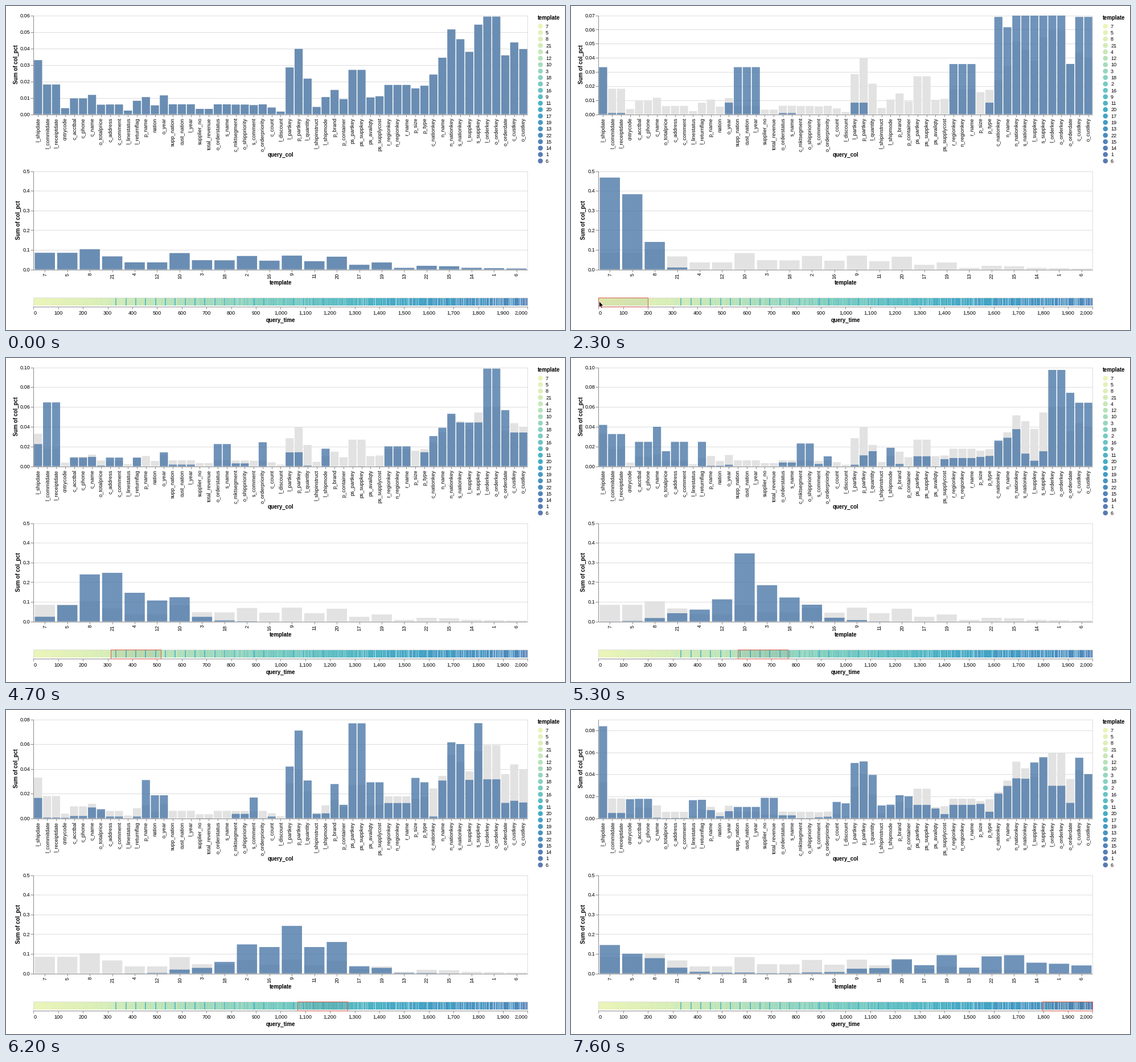
Animation of 982 by 570 pixels, one loop 7800 ms. Source, as a matplotlib script:

```python
import numpy as np
import matplotlib.pyplot as plt
from matplotlib.animation import FuncAnimation
from matplotlib.collections import LineCollection, PolyCollection
from matplotlib.colors import LinearSegmentedColormap
from matplotlib.patches import Circle, Polygon, Rectangle

W, H, DPI = 982, 570, 100
FRAMES, STEP_MS = 78, 100
PX = 72 / DPI
LEFT, RIGHT = 48.5, 916.5
COL_TOP, COL_BASE = 16.5, 190.5
TPL_TOP, TPL_BASE = 290.5, 463.5
STRIP_TOP, STRIP_BASE = 512.5, 528.5
BLUE, GREY, GRID, AXIS = "#4c78a8", "#e2e2e2", "#dddddd", "#8a8a8a"
plt.rcParams["font.family"] = "Liberation Sans"

COLUMNS = """l_shipdate l_commitdate l_receiptdate cntrycode c_acctbal c_phone
c_name o_totalprice c_address c_comment l_linestatus l_returnflag p_name nation
o_year supp_nation cust_nation l_year supplier_no total_revenue o_orderstatus
s_name c_mktsegment o_shippriority s_comment o_orderpriority c_count l_discount
l_partkey p_partkey l_quantity l_shipinstruct l_shipmode p_brand p_container
ps_partkey ps_suppkey ps_availqty ps_supplycost r_regionkey n_regionkey r_name
p_size p_type c_nationkey n_name n_nationkey s_nationkey l_suppkey s_suppkey
l_orderkey o_orderkey o_orderdate c_custkey o_custkey""".split()

ORDERS = "l_orderkey o_orderkey "
BUYER = "c_custkey o_custkey "
PART = "l_partkey p_partkey "
SUPPLY = "l_suppkey s_suppkey "
STOCK = "ps_partkey ps_suppkey "
REGION = "r_regionkey n_regionkey r_name "
NATIONS = "n_nationkey s_nationkey "

# Columns read by each query template; every read has the same weight.
USES = {
    7: ORDERS + BUYER + SUPPLY + NATIONS
       + "l_shipdate supp_nation cust_nation l_year c_nationkey n_name",
    5: ORDERS + BUYER + SUPPLY + NATIONS + REGION + "c_nationkey n_name o_orderdate",
    8: ORDERS + BUYER + SUPPLY + NATIONS + REGION + PART
       + "o_year p_type c_nationkey o_orderdate",
    21: ORDERS + SUPPLY + NATIONS
        + "s_name o_orderstatus l_receiptdate l_commitdate n_name",
    4: ORDERS + "o_orderpriority o_orderdate l_commitdate l_receiptdate",
    12: ORDERS + "l_shipmode l_commitdate l_shipdate l_receiptdate",
    10: ORDERS + BUYER + "c_name c_acctbal n_name c_address c_phone c_comment "
        "o_orderdate l_returnflag c_nationkey n_nationkey",
    3: ORDERS + BUYER + "c_mktsegment o_orderdate l_shipdate o_shippriority",
    18: ORDERS + BUYER + "c_name o_orderdate o_totalprice l_quantity",
    2: STOCK + REGION + NATIONS + "p_partkey s_suppkey p_size p_type ps_supplycost",
    16: STOCK + "p_brand p_type p_size p_partkey s_comment s_suppkey",
    9: ORDERS + PART + SUPPLY + STOCK + NATIONS + "nation o_year p_name",
    11: STOCK + NATIONS + "ps_supplycost ps_availqty s_suppkey n_name",
    20: PART + SUPPLY + STOCK + NATIONS
        + "p_name ps_availqty l_quantity l_shipdate n_name",
    17: PART + "p_brand p_container l_quantity",
    19: PART + "p_brand p_container l_quantity p_size l_shipmode l_shipinstruct",
    13: "c_count c_custkey",
    22: BUYER + "cntrycode c_acctbal c_phone",
    15: SUPPLY + "supplier_no total_revenue l_shipdate",
    14: PART + "l_shipdate",
    1: "l_returnflag l_linestatus l_shipdate",
    6: "l_shipdate l_discount l_quantity",
}
TEMPLATES = list(USES)
READS = np.array([[c in u.split() for c in COLUMNS] for u in USES.values()], float)
RANK = np.arange(len(TEMPLATES))

# Brush keys: frame, left, right, then centre and spread of the template ranks.
KEYS = np.array([
    (18, 0, 0, .2, 1), (23, 0, 199, .3, 1), (28, 0, 199, .3, 1),
    (31, 0, 203, .33, 1), (39, 0, 203, .33, 1), (47, 312, 515, 3.7, 1.6),
    (53, 564, 767, 6.3, 1.7), (62, 1068, 1271, 11, 2.2),
    (76, 1797, 2000, 18.3, 3.4)]).T

RAMP = LinearSegmentedColormap.from_list("ramp", [
    "#eaf5b9", "#dcefb8", "#c3e7b9", "#a2dabc", "#80cfc1", "#62c0c4",
    "#48b0c5", "#459dc5", "#4b8ec0", "#557fb6", "#5a79b2"])

fig = plt.figure(figsize=(W / DPI, H / DPI), dpi=DPI, facecolor="white")
ax = fig.add_axes([0, 0, 1, 1])
ax.set(xlim=(0, W), ylim=(H, 0))
ax.axis("off")


def shares(runs):
    """Column and template shares for the given number of runs per template."""
    reads = runs[:, None] * READS
    reads /= reads.sum()
    return reads.sum(axis=0), reads.sum(axis=1)


def bell(centre, spread):
    """Runs around a rank; the first templates come back after the last one."""
    return sum(np.exp(-((RANK + lap - centre) / spread) ** 2 / 2)
               for lap in (0, len(RANK)))


def label(x, y, s, ha="center", rot=0, bold=False):
    return ax.text(x, y, s, ha=ha, va="baseline", rotation=rot,
                   rotation_mode="anchor", color="black",
                   fontsize=(9.6 if bold else 9.2) * PX,
                   fontweight="bold" if bold else "normal", zorder=5)


def lines(segs, color, z):
    coll = LineCollection(segs, colors=color, linewidths=PX, zorder=z)
    return ax.add_collection(coll)


def bars(color, alpha, z):
    coll = PolyCollection([], facecolors=color, alpha=alpha, linewidths=0,
                          zorder=z, snap=False)
    return ax.add_collection(coll)


def bar_verts(values, base, scale):
    band = (RIGHT - LEFT) / len(values)
    x0 = LEFT + band * (np.arange(len(values)) + .05)
    x1, y = x0 + .9 * band, base - values * scale
    return [[(a, base), (a, t), (b, t), (b, base)] for a, b, t in zip(x0, x1, y)]


def centers(n):
    return LEFT + (RIGHT - LEFT) / n * (np.arange(n) + .5)


def time_x(v):
    return LEFT + (RIGHT - LEFT) * v / 2000


def frame_box(top, base):
    ax.add_patch(Rectangle((LEFT, top), RIGHT - LEFT, base - top, fill=False,
                           ec=GRID, lw=PX, zorder=1))
    lines([[(LEFT, base), (RIGHT, base)]], AXIS, 4)


def build_axes():
    for top, base in ((COL_TOP, COL_BASE), (TPL_TOP, TPL_BASE)):
        frame_box(top, base)
        lines([[(LEFT, top), (LEFT, base)]], AXIS, 4)
    for names, base in ((COLUMNS, COL_BASE), (TEMPLATES, TPL_BASE)):
        xs = centers(len(names))
        lines([[(x, base), (x, base + 4.5)] for x in xs], AXIS, 4)
        for x, name in zip(xs, names):
            label(x + 3, base + 6, name, "right", 90)
    for i in range(6):
        y = TPL_BASE - (TPL_BASE - TPL_TOP) * i / 5
        lines([[(LEFT, y), (RIGHT, y)]], GRID, 1)
        lines([[(LEFT - 5, y), (LEFT, y)]], AXIS, 4)
        label(42.5, y + 3.2, f"{i / 10:.1f}", "right")
    label(20.5, 103, "Sum of col_pct", rot=90, bold=True)
    label(25, 377, "Sum of col_pct", rot=90, bold=True)
    label(482.5, 264.5, "query_col", bold=True)
    label(482.5, 490.5, "template", bold=True)
    label(482.5, 555.5, "query_time", bold=True)


def build_legend():
    label(934, 24.5, "template", "left", bold=True)
    for i, name in enumerate(TEMPLATES):
        y = 35.5 + 11.29 * i
        ax.add_patch(Circle((938.8, y), 4.3, fc=RAMP(i / 21), lw=0))
        label(948, y + 3.2, str(name), "left")


def build_strip():
    rng = np.random.default_rng(7)
    pos = np.linspace(0, 1, 867)
    tone = .85 * pos + rng.normal(0, 1, pos.size) * (.01 + .06 * pos ** 2)
    period = (pos * 2000 - 330) % 40
    dark = (period < 4.5) & (pos > .165) & (pos < .6)
    tone[dark] = np.maximum(tone[dark], .45 + .25 * pos[dark])
    rgb = RAMP(np.clip(tone, 0, 1))[:, :3]
    pale = np.where(rng.random(pos.size) < .3 * pos, .5 * pos, 0)[:, None]
    rgb += (1 - rgb) * pale
    ax.imshow(rgb[None], extent=(49, 916, 527, 514), aspect="auto",
              interpolation="nearest", zorder=2)
    ax.set(xlim=(0, W), ylim=(H, 0))
    frame_box(STRIP_TOP, STRIP_BASE)
    for v in range(0, 2001, 100):
        x = time_x(v)
        lines([[(x, STRIP_BASE), (x, STRIP_BASE + 4.5)]], AXIS, 4)
        ha = "left" if v == 0 else "right" if v == 2000 else "center"
        label(x, 543, f"{v:,}", ha)


build_axes()
build_legend()
build_strip()

# Over the whole log templates run about equally often, the last ones less.
BASE_COLS, BASE_TPLS = shares(1 - .73 * (RANK / 21) ** 3)

grid = lines([], GRID, 1)
ticks = lines([], AXIS, 4)
tick_text = [label(42.5, 0, "", "right") for _ in range(8)]
col_all, tpl_all = bars(GREY, 1, 2), bars(GREY, 1, 2)
col_sel, tpl_sel = bars(BLUE, .8, 3), bars(BLUE, .8, 3)
brush = ax.add_patch(Rectangle((0, STRIP_TOP), 0, STRIP_BASE - STRIP_TOP,
                               fc=(.2, .2, .2, .08), ec="#d8604f", lw=PX, zorder=6))
ARROW = np.array([(0, 0), (0, 10.6), (2.4, 8.5), (4, 12.2), (5.7, 11.5),
                  (4.2, 7.9), (7.4, 7.7)])
cursor = ax.add_patch(Polygon(ARROW, fc="black", ec="white", lw=.5, zorder=8))


def cursor_at(f):
    """Tip of the pointer, or None while it is hidden."""
    if 1 <= f <= 8:
        u = 1 - (1 - (f - 1) / 7) ** 2
        return 334 - 277 * u, 560 - 46 * u
    if 9 <= f < 29:
        u = min(1, (f - 8) / 8)
        return 57 - 7.5 * u, 514 + 5.5 * u
    if 35 <= f < 40:
        u = min(1, (f - 35) / 2)
        return 92 - 10 * u, 517 + 4.5 * u
    return None


def update(f):
    brushed = f > KEYS[0, 0]
    left, right, centre, spread = (np.interp(f, KEYS[0], row) for row in KEYS[1:])
    cols, tpls = shares(bell(centre, spread)) if brushed else (BASE_COLS, BASE_TPLS)

    top = np.ceil(100 * max(cols.max(), BASE_COLS.max())) / 100
    scale = (COL_BASE - COL_TOP) / top
    marks = np.arange(0, top + 1e-6, .01 if top < .075 else .02)
    ys = COL_BASE - marks * scale
    grid.set_segments([[(LEFT, y), (RIGHT, y)] for y in ys])
    ticks.set_segments([[(LEFT - 5, y), (LEFT, y)] for y in ys])
    for i, t in enumerate(tick_text):
        t.set_visible(i < len(marks))
        if i < len(marks):
            t.set_text(f"{marks[i]:.2f}")
            t.set_y(ys[i] + 3.2)

    unit = (TPL_BASE - TPL_TOP) / .5
    col_all.set_verts(bar_verts(BASE_COLS, COL_BASE, scale))
    col_sel.set_verts(bar_verts(cols, COL_BASE, scale))
    tpl_all.set_verts(bar_verts(BASE_TPLS, TPL_BASE, unit))
    tpl_sel.set_verts(bar_verts(tpls, TPL_BASE, unit))

    brush.set_visible(brushed)
    brush.set_x(time_x(left))
    brush.set_width(time_x(right) - time_x(left))

    tip = cursor_at(f)
    cursor.set_visible(tip is not None)
    if tip:
        cursor.set_xy(ARROW + tip)
    return ()


anim = FuncAnimation(fig, update, frames=FRAMES, interval=STEP_MS,
                     repeat=True, repeat_delay=0, blit=False)
plt.show()
```
